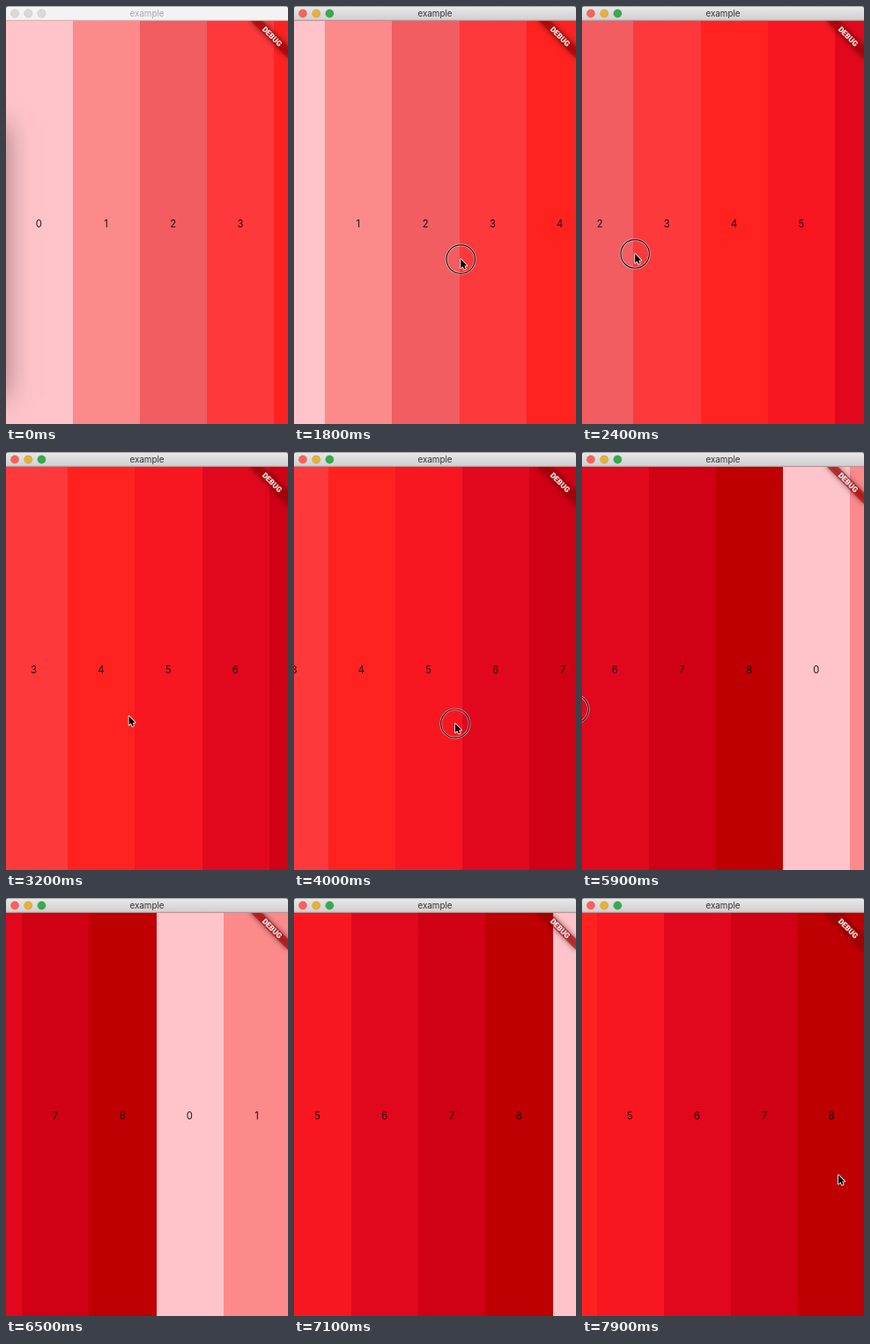
These frames come from a looping animation (320 px wide and 474 px high, 8000 ms). An HTML page with a canvas:

```html
<!DOCTYPE html>
<html lang="en">
<head>
<meta charset="utf-8">
<title>example</title>
<style>
  html, body { margin: 0; width: 100%; height: 100%; overflow: hidden; background: #be0003; }
  canvas { display: block; width: 320px; height: 474px; }
</style>
</head>
<body>
<canvas id="stage" width="320" height="474"></canvas>
<script>
const W = 320, H = 474, BAR = 16.5, LOOP = 8000, STEP = 100;
const ITEM = 76.25, SCROLL_START = 0.65, ACTIVE_AT = 900;
const REDS = ['#fec4ca', '#fc8a8b', '#f15d61', '#fd393c', '#ff221f', '#f81720', '#e1081d', '#d00015', '#be0003'];
const ctx = document.getElementById('stage').getContext('2d');

const smooth = u => u * u * (3 - 2 * u);
const fling = u => 1 - (1 - u) ** 5;

// "by" scrolls the list, "from" and "to" guide the pointer; a move with both is a drag
const drag = (start, end, by, [x, y], rise) =>
  ({ start, end, by, from: [x, y], to: [x - by, y - rise], ease: smooth });
const glide = (start, end, from, to) => ({ start, end, by: 0, from, to, ease: smooth });
const coast = (start, end, by, ease) => ({ start, end, by, ease });

const grab1 = [229.8, 289], grab2 = [214.4, 310.6];
const drag1 = drag(1392, 2933, 234.35, grab1, 11);
const drag2 = drag(3373, 6039, 225, grab2, 19);
const moves = [
  glide(300, drag1.start, [-12, 325], grab1),
  drag1,
  glide(drag1.end, drag2.start, drag1.to, grab2),
  drag2,
  coast(6050, 6650, 66, smooth),
  coast(6850, 7693, -161.25, fling),
  glide(7400, 7700, [335, 300], [291, 314])
];

function progress(move, t) {
  const u = (t - move.start) / (move.end - move.start);
  return move.ease(Math.min(1, Math.max(0, u)));
}

const scrollAt = t => moves.reduce((sum, m) => sum + m.by * progress(m, t), SCROLL_START);

function label(text, x, y, font, color) {
  ctx.font = font;
  ctx.fillStyle = color;
  ctx.textAlign = 'center';
  ctx.textBaseline = 'alphabetic';
  ctx.fillText(text, x, y);
}

function disc(x, y, r) {
  ctx.beginPath();
  ctx.arc(x, y, r, 0, Math.PI * 2);
}

function outline(color, width) {
  ctx.strokeStyle = color;
  ctx.lineWidth = width;
  ctx.stroke();
}

// Blurred shadow only; the casting shape stays off stage
function softRect(x, y, w, h, blur, color, angle = 0, ox = 0, oy = 0) {
  ctx.save();
  ctx.shadowColor = color;
  ctx.shadowBlur = blur;
  ctx.shadowOffsetX = 1000;
  ctx.translate(ox - 1000, oy);
  ctx.rotate(angle);
  ctx.fillStyle = '#000';
  ctx.fillRect(x, y, w, h);
  ctx.restore();
}

function drawStripes(offset) {
  for (let i = Math.floor(offset / ITEM); i * ITEM - offset < W; i++) {
    const x = i * ITEM - offset, left = Math.round(x), n = i % REDS.length;
    ctx.fillStyle = REDS[n];
    ctx.fillRect(left, BAR, Math.round(x + ITEM) - left, H - BAR);
    label(n, x + ITEM / 2 - 0.3, 251, '11.2px Inter, Roboto, sans-serif', 'rgba(0,0,0,.88)');
  }
}

function drawRibbon() {
  const k = 0.75, rect = [-40 * k, 28 * k, 80 * k, 12 * k];
  softRect(...rect, 6, 'rgba(0,0,0,.5)', Math.PI / 4, W, BAR);
  ctx.save();
  ctx.translate(W, BAR);
  ctx.rotate(Math.PI / 4);
  ctx.fillStyle = 'rgba(190,0,3,.63)';
  ctx.fillRect(...rect);
  label('DEBUG', 0, 38 * k, '900 8.6px Roboto, sans-serif', '#fff');
  ctx.restore();
}

function drawTitleBar(active) {
  const fill = ctx.createLinearGradient(0, 0, 0, BAR);
  fill.addColorStop(0, active ? '#e9e9e9' : '#f5f5f5');
  fill.addColorStop(1, active ? '#cfcfcf' : '#f2f2f2');
  ctx.fillStyle = '#6a6a6a';
  ctx.fillRect(0, 0, W, 5);
  ctx.fillStyle = fill;
  ctx.beginPath();
  ctx.roundRect(0, 0.6, W, BAR - 0.6, [3, 3, 0, 0]);
  ctx.fill();
  ctx.fillStyle = active ? '#b0a8a8' : '#d8cfcf';
  ctx.fillRect(0, BAR - 0.8, W, 0.8);
  ['#fc605c', '#e6af3e', '#36ab4b'].forEach((color, i) => {
    disc(10 + i * 15.2, 8.5, 4.7);
    ctx.fillStyle = active ? color : '#d9d9d9';
    ctx.fill();
    outline('rgba(0,0,0,.14)', 0.5);
  });
  label('example', 160, 12, '9.8px Inter, Roboto, sans-serif', active ? '#333' : '#a8a8a8');
}

function drawPointer(t) {
  const move = moves.filter(m => m.from && t >= m.start).pop();
  if (!move) return;
  const u = progress(move, t);
  const [x, y] = move.from.map((a, i) => a + (move.to[i] - a) * u);
  if (move.by && t < move.end) {
    disc(x, y, 16.2);
    outline('rgba(255,255,255,.6)', 2.6);
    outline('#111', 1.2);
  }
  ctx.save();
  ctx.translate(x, y);
  ctx.scale(0.9, 0.9);
  ctx.lineJoin = 'round';
  const arrow = new Path2D('M0 0V11.3L2.6 9L4.3 12.8L6.2 12L4.6 8.3L8 8.2Z');
  ctx.strokeStyle = '#fff';
  ctx.lineWidth = 1.8;
  ctx.stroke(arrow);
  ctx.fillStyle = '#000';
  ctx.fill(arrow);
  ctx.restore();
}

function draw(t) {
  const active = t >= ACTIVE_AT;
  ctx.clearRect(0, 0, W, H);
  ctx.save();
  ctx.beginPath();
  ctx.rect(0, BAR, W, H - BAR);
  ctx.clip();
  drawStripes(scrollAt(t));
  if (!active) softRect(-120, 135, 119, 308, 30, 'rgba(0,0,0,.42)');
  drawRibbon();
  ctx.restore();
  drawTitleBar(active);
  drawPointer(t);
}

const start = performance.now();
function tick() {
  const t = (performance.now() - start) % LOOP;
  draw(Math.floor(t / STEP) * STEP);
  requestAnimationFrame(tick);
}
tick();
</script>
</body>
</html>
```
